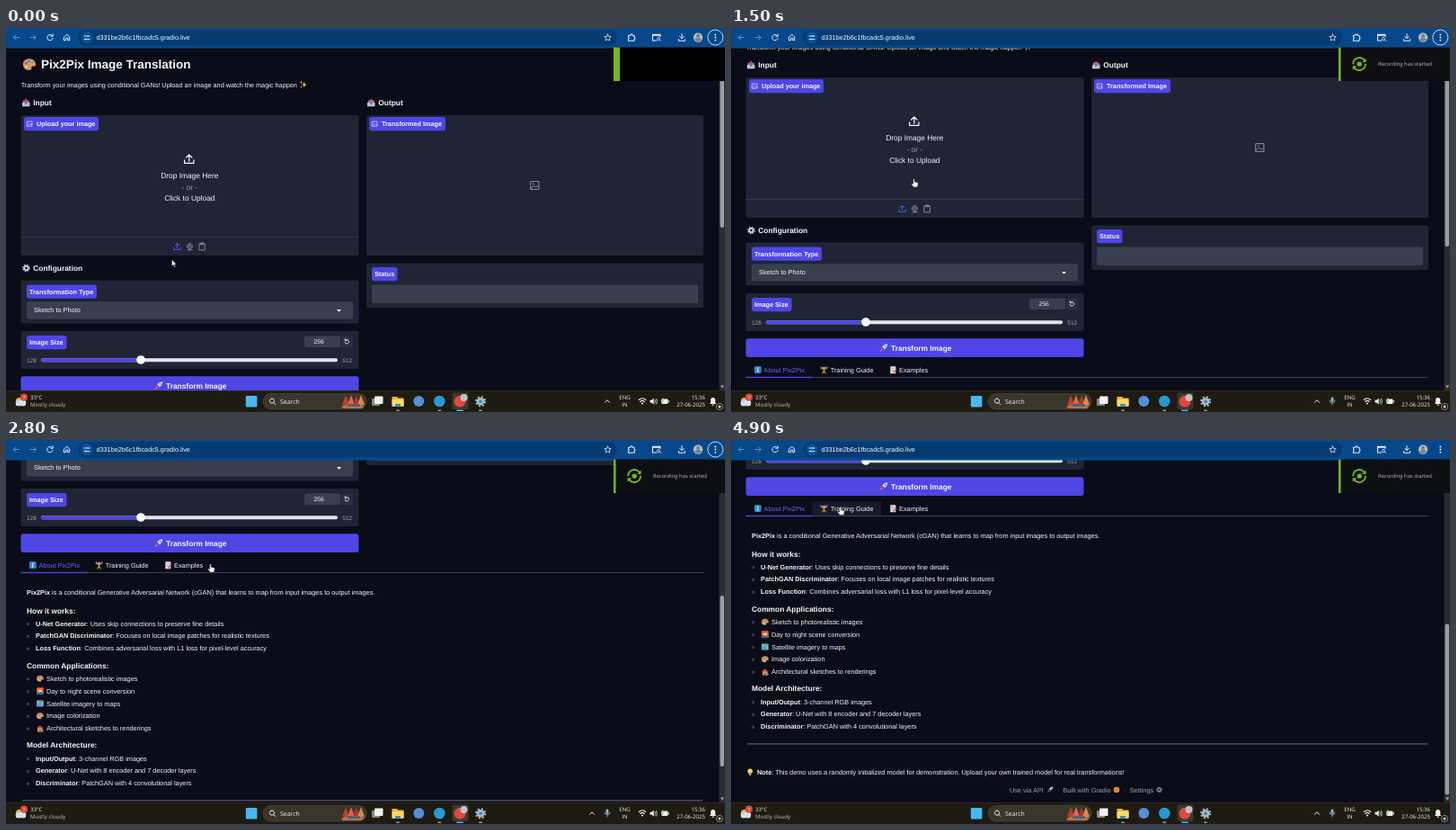
Write an HTML page that moves like this. It is 800 px wide and 427 px high and loops after 5 s.

```html
<!DOCTYPE html>
<html lang="en">
<head>
<meta charset="utf-8">
<title>Image translation demo</title>
<style>
html, body { margin: 0; width: 100%; height: 100%; overflow: hidden; background: #0a0c18; }
svg { display: block; width: 800px; height: 427px; }
text { font-family: "Liberation Sans", Arial, sans-serif; white-space: pre; text-rendering: geometricPrecision; }
.ui { font-family: "Open Sans", "Noto Sans", sans-serif; }
</style>
</head>
<body>
<svg id="stage" viewBox="0 0 800 427"></svg>
<script>
const ACCENT = '#4f46e5', PANEL = '#1f2534', FIELD = '#383f4e', GREY = '#9ca3af', WHITE = '#f6f7fa';
const BASE = 7.33, LARGE = 8.4;

const rect = (x, y, w, h, fill, r = 0, more = '') =>
  `<rect x="${x}" y="${y}" width="${w}" height="${h}" rx="${r}" fill="${fill}" ${more}/>`;
const dot = (x, y, r, fill, more = '') => `<circle cx="${x}" cy="${y}" r="${r}" fill="${fill}" ${more}/>`;
const text = (x, y, s, size = BASE, fill = WHITE, more = '') =>
  `<text x="${x}" y="${y}" font-size="${size}" fill="${fill}" ${more}>${s}</text>`;
const bold = (x, y, s, size = BASE, fill = WHITE) => text(x, y, s, size, fill, 'font-weight="700"');
const ui = (x, y, s, size = 6.1, fill = '#f2f2ee', more = '') => text(x, y, s, size, fill, `class="ui" ${more}`);
const shape = (d, fill) => `<path d="${d}" fill="${fill}"/>`;
const line = (d, stroke = '#e3ecf7', w = 1) =>
  `<path d="${d}" fill="none" stroke="${stroke}" stroke-width="${w}" stroke-linecap="round" stroke-linejoin="round"/>`;
const group = (id, body, more = '') => `<g id="${id}" ${more}>${body}</g>`;
const strong = s => `<tspan font-weight="700">${s}</tspan>`;

const gear = (fill, hole) => dot(5, 5, 3.4, fill) +
  `<circle cx="5" cy="5" r="4" fill="none" stroke="${fill}" stroke-width="1.6" stroke-dasharray="1.57"/>` + dot(5, 5, 1.5, hole);
const tray = arrow => rect(1, 2, 8, 5, '#8d7be8', 1) + shape('M0 5H3L4 7H6L7 5H10V9Q10 10 9 10H1Q0 10 0 9Z', '#b9c3d3') +
  shape(arrow, '#dc4658');

// Icons live in a 10 by 10 box.
const icons = {
  palette: shape('M5 .5C8 .5 10 2.5 10 5S8 6 7 6.5 8 9.5 5 9.5 0 8 0 5 2 .5 5 .5Z', '#d99a77') +
    dot(2.4, 4, 1, '#e33d48') + dot(4.6, 2.4, 1, '#4387e8') + dot(7.4, 3.2, 1, '#55b65a') + dot(2.8, 6.8, 1, '#f4d24b'),
  sparkles: shape('M6 1L7 4.2 10 5.2 7 6.2 6 9.5 5 6.2 2 5.2 5 4.2ZM2 0L2.6 1.6 4 2 2.6 2.6 2 4 1.4 2.6 0 2 1.4 1.6ZM2 6.5L2.6 8 4 8.4 2.6 8.8 2 10 1.4 8.8 0 8.4 1.4 8Z', '#f7c14c'),
  inbox: tray('M4 0H6V3H8L5 6 2 3H4Z'),
  outbox: tray('M4 6H6V3H8L5 0 2 3H4Z'),
  gear: gear('#d5dae2', '#0a0c18'),
  dimGear: gear('#858b98', '#0a0c18'),
  settings: gear('#a9bdcb', '#3289c8'),
  rocket: shape('M9.7 .3Q6 .3 3.5 3.8L6.2 6.5Q9.7 4 9.7 .3Z', '#d9dee8') + shape('M3.5 3.8L.8 4.6 2.8 5.5ZM6.2 6.5L5.4 9.2 4.5 7.2Z', '#e0455a') +
    dot(7, 3, .9, '#3c7fd0') + shape('M2.8 6L4 7.2.3 9.7Z', '#f5a13c'),
  info: rect(0, 0, 10, 10, '#2f87d9', 1.5) + rect(4.2, 4.2, 1.6, 4, '#fff') + dot(5, 2.5, 1, '#fff'),
  lifter: line('M1 2H9', '#a7adb8', 1) + line('M1 .5V3.5M9 .5V3.5', '#777e8c', 1.5) + dot(5, 2.2, 1.4, '#e8b13f') +
    line('M2.5 2.5L5 5 7.5 2.5M5 5V6.5M5 6.5L3 9.5M5 6.5L7 9.5', '#d5923b', 1.6),
  memo: rect(1, 0, 7.5, 10, '#e7e5e5', .7) + line('M2.5 2.5H7M2.5 4.5H6M2.5 6.5H5', '#8d95a3', .7) + line('M9 4L5.5 8.5', '#e04d55', 1.7),
  sunrise: rect(0, 0, 10, 10, '#e9603f', 1) + dot(5, 6, 3, '#ffd451') + rect(0, 6.5, 10, 3.5, '#3e65a8'),
  map: rect(0, .5, 10, 9, '#5aa7db', .6) + shape('M1 1.5H5L4 5 2 6ZM6 4L9 3V8L7 8.5Z', '#8dc77b') + line('M3.3 .5V9.5M6.7 .5V9.5', '#38739f', .5),
  house: rect(1.5, 4, 7, 6, '#d8a878') + shape('M0 5L4.5 .5 10 5Z', '#c94f45') + rect(4, 6.5, 2, 3.5, '#75503d') + dot(8.5, 8.5, 1.5, '#5b9b54'),
  bulb: dot(5, 3.8, 3.7, '#fbd046') + rect(3.5, 6.5, 3, 3.5, '#a6abb4', .8),
  image: line('M1 1H9V9H1ZM1 8L4 5 6 7 7.5 5.5 9 7', 'currentColor', .9) + dot(3.4, 3.4, .7, 'currentColor'),
  upload: line('M5 7V1M2.3 3.5L5 .8 7.7 3.5M.5 6V9H9.5V6', 'currentColor', 1.1),
  webcam: line('M5 1A3.5 3.5 0 1 1 4.9 1M5 3A1.5 1.5 0 1 1 4.9 3M2 9.5H8', 'currentColor', 1),
  clipboard: line('M1.5 1.5H8.5V9.7H1.5ZM3.5 .5H6.5V2.5H3.5Z', 'currentColor', .9)
};
const icon = (name, x, y, w, color = WHITE) =>
  `<g transform="translate(${x} ${y}) scale(${w / 10})" color="${color}">${icons[name]}</g>`;

const badge = (x, y, w, s, pic) => rect(x, y, w, 15.3, ACCENT, 3) +
  (pic ? icon('image', x + 3, y + 4.3, 6.6) : '') + bold(x + (pic ? 14 : 3), y + 10.2, s, 7.27);
const heading = (y, s) => bold(23, y, s, LARGE);
const bullet = (y, s, pic) => dot(24.6, y - 2, 1.1, 'none', 'stroke="#737a88" stroke-width=".7"') +
  (pic ? icon(pic, 34, y - 6.4, 7.8) : '') + text(pic ? 45 : 33, y, s);
const bullets = (y, items) => items.map(([s, pic], i) => bullet(y + i * 13.85, s, pic)).join('');

function pageBody() {
  return [
    icon('palette', 19, 33.5, 14), bold(39, 45, 'Pix2Pix Image Translation', 13.5),
    text(16.7, 65.5, 'Transform your images using conditional GANs! Upload an image and watch the magic happen', 7.31),
    icon('sparkles', 327, 58.8, 8),
    icon('inbox', 18, 78.8, 8.5), bold(30.3, 86, 'Input', LARGE),
    icon('outbox', 402, 78.8, 8.5), bold(414.3, 86, 'Output', LARGE),

    rect(16.5, 97, 376, 156, PANEL, 2), badge(20, 99, 83, 'Upload your image', true),
    icon('upload', 198, 140, 11.5),
    text(204.3, 167, 'Drop Image Here', LARGE, WHITE, 'text-anchor="middle"'),
    text(204.3, 179.6, '- or -', LARGE, GREY, 'text-anchor="middle"'),
    text(204.3, 192.2, 'Click to Upload', LARGE, WHITE, 'text-anchor="middle"'),
    rect(16.5, 232, 376, .8, '#343c4c'),
    icon('upload', 186.3, 238.8, 8.4, '#5f58f0'), icon('webcam', 200.3, 238.8, 8.4, GREY), icon('clipboard', 214, 238.6, 8.6, GREY),

    rect(401, 97, 375, 156, PANEL, 2), badge(404, 99, 85, 'Transformed Image', true),
    icon('image', 583, 169.5, 11, '#8b929f'),
    rect(401, 261.5, 375, 49.5, PANEL, 2), badge(407, 266, 28.5, 'Status'), rect(407, 285.5, 363, 20.5, FIELD, 2),

    icon('gear', 18, 262.5, 9), bold(30.3, 270, 'Configuration', LARGE),
    rect(16.5, 280.5, 376, 48, PANEL, 2), badge(23, 285.5, 78, 'Transformation Type'),
    rect(23, 304.3, 363, 19.3, FIELD, 2), text(31, 316.3, 'Sketch to Photo'), shape('M368 313H373L370.5 315.7Z', WHITE),
    rect(16.5, 337, 376, 42, PANEL, 2), badge(23, 342, 44.5, 'Image Size'),
    rect(332, 342.5, 40, 12.5, FIELD, 2), rect(373, 342.5, 13, 12.5, '#293141', 2),
    text(342.5, 351, '256', 6.7),
    line('M377.6 347.2A2.3 2.3 0 1 1 377 349.5M377.2 345.5V347.6H379.2', WHITE, .8),
    text(23, 371.5, '128', 6.5, GREY), text(374.3, 371.5, '512', 6.5, GREY),
    rect(39, 367.2, 330, 4, '#e2e6ee', 2), rect(39, 367.2, 111, 4, ACCENT, 2), dot(150, 369, 4.8, '#fff'),

    rect(16.5, 387.3, 376, 20.7, ACCENT, 3), icon('rocket', 165, 393, 9.5), bold(178, 401, 'Transform Image', LARGE),

    rect(90.5, 414.5, 76.5, 16, '#151b2a', 0, 'id="hover"'),
    icon('info', 26, 418.3, 7.7), text(36.5, 425, 'About Pix2Pix', BASE, '#6a65f5'),
    icon('lifter', 99.5, 418.2, 8), text(110.7, 425, 'Training Guide'),
    icon('memo', 176.5, 418.2, 8), text(187, 425, 'Examples'),
    rect(16.5, 430.2, 759.5, .8, '#4b5260'), rect(16.5, 429.8, 74, 1.3, ACCENT),

    text(23, 455, strong('Pix2Pix') + ' is a conditional Generative Adversarial Network (cGAN) that learns to map from input images to output images.'),
    heading(475.5, 'How it works:'),
    bullets(489.6, [
      [strong('U-Net Generator') + ': Uses skip connections to preserve fine details'],
      [strong('PatchGAN Discriminator') + ': Focuses on local image patches for realistic textures'],
      [strong('Loss Function') + ': Combines adversarial loss with L1 loss for pixel-level accuracy']]),
    heading(536.6, 'Common Applications:'),
    bullets(550.8, [
      ['Sketch to photorealistic images', 'palette'], ['Day to night scene conversion', 'sunrise'],
      ['Satellite imagery to maps', 'map'], ['Image colorization', 'palette'],
      ['Architectural sketches to renderings', 'house']]),
    heading(625.4, 'Model Architecture:'),
    bullets(639.6, [
      [strong('Input/Output') + ': 3-channel RGB images'],
      [strong('Generator') + ': U-Net with 8 encoder and 7 decoder layers'],
      [strong('Discriminator') + ': PatchGAN with 4 convolutional layers']]),
    rect(18, 683.5, 757, .9, '#777a7c'),
    icon('bulb', 17.5, 711.5, 7.5),
    text(29, 718, strong('Note') + ': This demo uses a randomly initialized model for demonstration. Upload your own trained model for real transformations!'),
    text(310, 737.6, 'Use via API', BASE, GREY), icon('rocket', 351.5, 731.3, 7), text(363, 737.6, '·', BASE, GREY),
    text(369.3, 737.6, 'Built with Gradio', BASE, GREY), dot(429, 735, 3.3, '#e8862e'), text(437.5, 737.6, '·', BASE, GREY),
    text(443.7, 737.6, 'Settings', BASE, GREY), icon('dimGear', 473, 731.5, 7)
  ].join('');
}

function browserBar() {
  return [
    rect(0, 0, 800, 22.5, '#07488a'), rect(80, 2, 600, 17.5, '#063b72', 8.7),
    line('M14.5 10.5H8.5M11 7.8L8.3 10.5 11 13.2M27 10.5H33M30.5 7.8L33.2 10.5 30.5 13.2', '#6f9bc9', .9),
    line('M51.6 8.6A3.2 3.2 0 1 0 52.2 11.3M52.2 6.8V9.2H49.8'),
    line('M64.7 10L67.7 7 70.7 10V13.7H68.7V11H66.7V13.7H64.7Z'),
    dot(90, 10.7, 6.4, '#0a5299'), line('M87 9H89.5M92 9H93M87 12.5H88M90.5 12.5H93', '#e3ecf7', .9),
    dot(91, 9, .9, '#e3ecf7'), dot(89, 12.5, .9, '#e3ecf7'),
    text(100.5, 13.2, 'd331be2b6c1fbcadc5.gradio.live', 7.26),
    line('M669.5 7L670.6 9.4 673.2 9.7 671.3 11.4 671.8 14 669.5 12.7 667.2 14 667.7 11.4 665.8 9.7 668.4 9.4Z', '#e3ecf7', .8),
    line('M692.5 8.2H694.6A1.3 1.3 0 0 1 697.2 8.2H699V10A1.3 1.3 0 0 1 699 12.5V14.2H692.5V12.2A1.2 1.2 0 0 0 692.5 10Z', '#e3ecf7', 1.1),
    line('M724 14H719.5V7.3H728V9.5M719.5 8.2H728', '#e3ecf7', 1.1), line('M726 10.5A1.5 1.5 0 1 1 725.9 10.5M727.2 13L728.7 14.5', '#e3ecf7', .9),
    line('M752 6.5V11.5M749.7 9.4L752 11.7 754.3 9.4M748.5 12.5V14.3H755.5V12.5'),
    dot(770, 10.5, 5.2, '#b4bbc4'), shape('M766 13Q770 8 774 13Q770 17 766 13Z', '#75818c'), dot(770, 8.7, 2, '#76808a'),
    dot(789.3, 10.5, 8.5, 'none', 'id="ring" stroke="#c5dcf5" stroke-width="1"'),
    [7.4, 10.5, 13.6].map(y => dot(789.3, y, .9, '#fff')).join('')
  ].join('');
}

function taskbar() {
  const mark = (x, w, fill = '#9b9a94') => rect(x - w / 2, 424.6, w, 1.4, fill, .7);
  return [
    rect(0, 403, 800, 24, '#1d1b12'), rect(0, 403, 800, .6, '#35332a'),
    dot(15, 415, 4, '#f2b63c'), dot(14, 417, 3.3, '#c4d5e8'), dot(18.5, 416.5, 3.8, '#d9e4f0'), rect(11, 416.5, 11, 3.8, '#d1dfee', 1.9),
    dot(20, 410.7, 4.1, '#d9443c'), ui(18.5, 412.8, '7', 5.6),
    ui(27, 412.9, '33°C'), ui(27, 421.2, 'Mostly cloudy', 6.1, '#c8c7c0'),
    rect(266.8, 409, 12.6, 12.6, '#46b9f4', 1),
    rect(286, 406.5, 115, 17.5, '#39362c', 8.7, 'stroke="#504d42" stroke-width=".6"'),
    line('M296 412A2.6 2.6 0 1 1 295.9 412M297.8 416.5L299.8 418.5', '#eee', 1), ui(305, 418, 'Search', 6.9),
    shape('M373 421Q384 415 399 420L396 423H375Z', '#c46f43'),
    [[378, '#b5403a'], [384, '#db6a43'], [390, '#a9333b'], [395, '#d78a4a']].map(([x, c]) => shape(`M${x} 408L${x + 4} 419H${x - 4}Z`, c)).join(''),
    rect(380, 418, 14, 3, '#466675', 1),
    rect(407, 412, 9, 8, '#87898c', 1), rect(410, 409.5, 9.5, 8.5, '#f1f1f1', 1),
    shape('M429.5 410H435L436.5 411.5H442.5V420.5H429.5Z', '#f1b52f'), rect(429.5, 413, 13, 7.8, '#ffd968', .8), rect(433, 418, 6, 2.8, '#3787c8', .5),
    dot(459.3, 415, 6, '#538ed6'), dot(482.3, 415, 6.3, '#2599d5'),
    rect(496.5, 405.5, 18, 18.5, '#3b392f', 2), dot(505, 415.2, 6.4, '#e2483c'), dot(509.5, 411, 4, '#bdc2c6'),
    icon('settings', 521.8, 409, 12.6),
    mark(436, 4), mark(482.3, 4), mark(505, 8, '#52b8ee'), mark(528, 4),
    group('caret', line('M-2.5 1.3L0 -1.3 2.5 1.3', '#eee')),
    group('mic', rect(667.6, 410.5, 2.8, 5.5, '#91b9cc', 1.4) + line('M666 414A3 3 0 0 0 672 414M669 417V419', '#91b9cc', .8)),
    ui(688.5, 413.3, 'ENG', 6.1, '#f2f2ee', 'text-anchor="middle"'), ui(688.5, 421.3, 'IN', 6.1, '#f2f2ee', 'text-anchor="middle"'),
    line('M704.2 413.5Q708 410 711.8 413.5M705.7 415.5Q708 413.2 710.3 415.5', '#eee', 1.1), dot(708, 417.5, 1.1, '#eee'),
    shape('M716.5 413.8H718.3L720.7 411.7V418.7L718.3 416.6H716.5Z', '#eee'), line('M722 413.5Q723.3 415.2 722 417M723.5 412.2Q725.7 415.2 723.5 418.3', '#eee', .8),
    rect(729.5, 412.5, 7, 5.5, '#eee', 1), rect(736.8, 414, 1, 2.5, '#eee'), shape('M731 411L732 415 730 418 728.8 414Z', '#b8d67a'),
    ui(778, 413.3, '15:36', 6.1, '#f2f2ee', 'text-anchor="end"'), ui(778, 421.3, '27-06-2025', 6.1, '#f2f2ee', 'text-anchor="end"'),
    shape('M783 418L784 416.5V413.5A2.6 2.6 0 0 1 789.2 413.5V416.5L790.2 418Z', '#eee'), rect(785.5, 418.5, 2.3, 1.2, '#eee', .6),
    dot(794, 421, 3.6, '#15140f', 'stroke="#bbb" stroke-width=".7"'), dot(794, 421, 1.5, '#ddd')
  ].join('');
}

const scrollbar = rect(793.5, 22.5, 6.5, 381, '#2b2c30') + rect(794.5, 32, 4.5, 190, '#9c9da0', 2.2, 'id="thumb"') +
  shape('M794.7 29.5H799.3L797 26.5ZM794.7 397.5H799.3L797 400.5Z', '#9c9da0');
const notice = rect(676, 21.5, 124, 37.5, '#000', 0, 'id="noticeBack"') + rect(676, 21.5, 7, 37.5, '#76b921', 0, 'id="noticeBar"') +
  group('noticeText', line('M692.2 39.5A7 7 0 0 1 704.5 35.5M706 40.5A7 7 0 0 1 693.8 44.7', '#76b921', 1.8) +
    shape('M706.6 33.5V38H702.2ZM691.7 46.8V42.2H696.2Z', '#76b921') + dot(699.2, 40.1, 2.7, '#76b921') +
    ui(720, 42.4, 'Recording has started', 5.9, '#b9babb'));
const pointers = group('arrow', '<path d="M0 0V7.3L1.7 5.8 2.9 8.4 4.1 7.9 3 5.4H5.2Z" fill="#fff" stroke="#111" stroke-width=".5"/>') +
  group('hand', '<path d="M-1.3 -4Q-.4 -5.2 .3 -4V-1.2L3.5 -.5Q4.4 -.2 4.2 1L3.5 4.6H-.8L-3.5 1.3Q-3.2 0 -1.3 1.2Z" fill="#fff" stroke="#111" stroke-width=".5"/>');

document.getElementById('stage').innerHTML =
  rect(0, 0, 800, 427, '#0a0c18') + group('page', pageBody()) + scrollbar + browserBar() + notice + taskbar() + pointers;

// Each key is a time in ms followed by its values.
const scrollKeys = [[0, 0], [700, 0], [1100, 37], [1300, 42], [1800, 42], [2200, 119], [2400, 125], [2600, 186], [2800, 283], [3100, 346], [5000, 346]];
const pointerKeys = [[0, 184.5, 257.5], [200, 184.5, 257.5], [700, 168, 217], [1200, 168, 217], [1700, 228, 142.5], [3700, 228, 142.5], [4200, 150, 98], [4500, 124, 81], [4800, 122, 79], [5000, 122, 79]];

function at(keys, t) {
  const i = Math.max(1, keys.findIndex(k => k[0] >= t)), a = keys[i - 1], b = keys[i];
  const u = (t - a[0]) / (b[0] - a[0]);
  return a.slice(1).map((v, n) => v + (b[n + 1] - v) * u);
}
const el = id => document.getElementById(id);
const set = (id, name, value) => el(id).setAttribute(name, value);
const show = (id, on) => set(id, 'visibility', on ? 'visible' : 'hidden');
const move = (id, x, y) => set(id, 'transform', `translate(${x} ${y})`);

function draw(t) {
  const [scroll] = at(scrollKeys, t), [x, y] = at(pointerKeys, t);
  const hover = t > 3700 && x > 91 && x < 167 && y > 69 && y < 85;
  const hand = hover || (t >= 400 && t <= 3700);
  move('page', 0, -scroll);
  set('thumb', 'y', 32 + scroll * .4986);
  show('hover', hover);
  show('hand', hand);
  show('arrow', !hand);
  move('hand', x, y);
  move('arrow', x, y);
  show('ring', t < 4600);
  show('mic', t >= 400);
  move('caret', t >= 400 ? 652 : 669, 415);
  set('noticeBar', 'width', Math.max(2.5, 7 - t * .0225));
  set('noticeBack', 'fill', t < 200 ? '#000' : '#0e0f12');
  set('noticeText', 'opacity', Math.min(1, Math.max(0, (t - 100) / 300)));
}

const start = performance.now();
function tick(now) {
  const t = Math.max(0, now - start) % 5000;
  draw(Math.floor(t / 100) * 100);
  requestAnimationFrame(tick);
}
tick(start);
</script>
</body>
</html>
```
